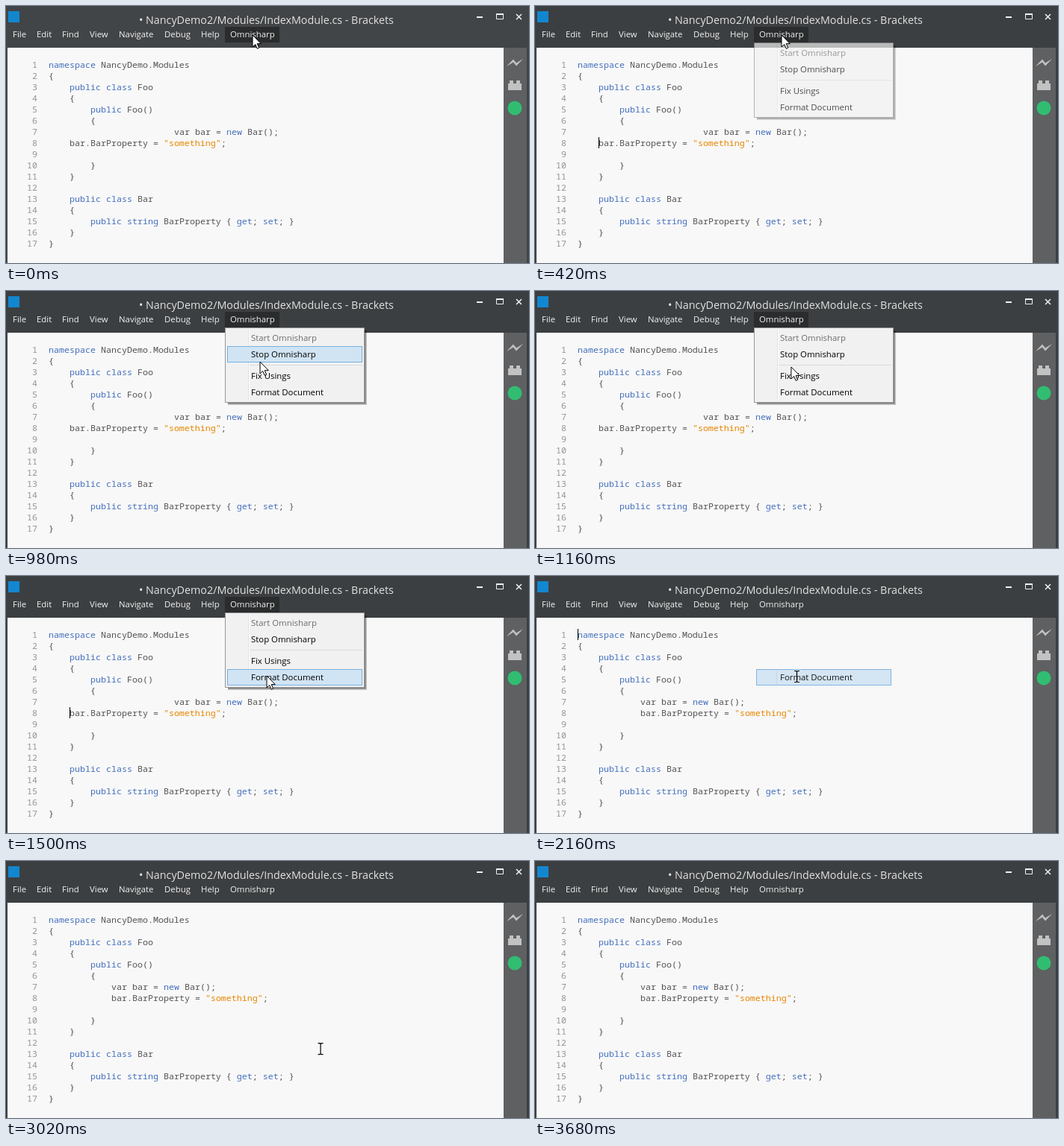
An HTML page for the animation above (3900 ms loop, 700x345 px).

```html
<!DOCTYPE html>
<html lang="en">
<head>
<meta charset="utf-8">
<title>Format document</title>
<style>
  html, body { margin: 0; width: 100%; height: 100%; overflow: hidden; background: #3c3f41; }
  svg { display: block; width: 700px; height: 345px; }
  text { white-space: pre; }
  .ui { font: 11.4px "Open Sans", "Noto Sans", sans-serif; }
  .title { font: 14.3px "Open Sans", "Noto Sans", sans-serif; }
  .code { font: 11.667px "Noto Sans Mono", "DejaVu Sans Mono", monospace; fill: #535353; }
  .number { fill: #949494; text-anchor: end; }
  .keyword { fill: #446fbd; }
  .string { fill: #e88501; }
</style>
</head>
<body>
<svg id="stage" viewBox="0 0 700 345"></svg>
<script>
const LOOP = 3900;
const stage = document.getElementById("stage");

function add(parent, tag, attrs = {}, text) {
  const node = document.createElementNS("http://www.w3.org/2000/svg", tag);
  for (const key in attrs) node.setAttribute(key, attrs[key]);
  if (text !== undefined) node.textContent = text;
  parent.append(node);
  return node;
}
const rect = (parent, x, y, width, height, fill, more) =>
  add(parent, "rect", { x, y, width, height, fill, ...more });
const label = (parent, x, y, text, fill, cls = "ui") =>
  add(parent, "text", { x, y, fill, class: cls }, text);
const show = (node, opacity) => node.setAttribute("opacity", opacity);
const move = (node, [x, y]) => node.setAttribute("transform", `translate(${x} ${y})`);

// Window frame
const frame = rect(stage, 0, 0, 700, 345, "#3c3f41");
const menuTab = rect(stage, 293, 28, 73, 21, "#2a2c2d");
rect(stage, 2, 56, 664, 289, "#f8f8f8");
rect(stage, 666, 56, 31, 289, "#5e6062");
rect(stage, 3, 7, 15, 15, "#1287d0");
label(stage, 178, 24, "• NancyDemo2/Modules/IndexModule.cs - Brackets", "#e2e2e2", "title");
const menus = { File: 9, Edit: 41, Find: 75, View: 112, Navigate: 151, Debug: 212, Help: 261, Omnisharp: 300 };
for (const name in menus) label(stage, menus[name], 42, name, "#f2f2f2");
rect(stage, 630, 14, 8, 2, "#f0f0f0");
add(stage, "path", { d: "M656.5 11V17.5H665.5V11Z", fill: "none", stroke: "#f0f0f0" });
rect(stage, 656, 10, 10, 2, "#f0f0f0");
add(stage, "path", { d: "M683 11L690 18M690 11L683 18", stroke: "#f0f0f0", "stroke-width": 1.5 });

// Side bar
add(stage, "path", { d: "M670 81L679 71.5L683 76.5L692 71L683 80.5L679 75.5Z", fill: "#c2c2c2" });
add(stage, "path", { d: "M672 113V104H674V100H679V104H683V100H688V104H690V113Z", fill: "#c2c2c2" });
add(stage, "circle", { cx: 681, cy: 137, r: 9.5, fill: "#31bd71" });

// Code
const lines = [
  "namespace NancyDemo.Modules", "{", "    public class Foo", "    {",
  "        public Foo()", "        {", "            var bar = new Bar();",
  "            bar.BarProperty = \"something\";", "", "        }", "    }", "",
  "    public class Bar", "    {", "        public string BarProperty { get; set; }",
  "    }", "}"
];
const tokens = /("[^"]*"|\b(?:namespace|public|class|new|string|get|set)\b)/;

const rows = lines.map((line, i) => {
  const y = 83 + 15 * i;
  label(stage, 42, y, i + 1, "#949494", "code number");
  const row = add(stage, "text", { x: 57 + 7 * line.search(/\S|$/), y, class: "code" });
  // Splitting on a captured group leaves the tokens at odd places
  line.trim().split(tokens).forEach((part, n) => {
    const token = part[0] === '"' ? "string" : "keyword";
    add(row, "tspan", { class: n % 2 ? token : "" }, part);
  });
  return row;
});
const caret = rect(stage, 0, 0, 1, 15, "#000");

// Drop-down menu
const ITEM_HEIGHT = 22;
const items = [
  { name: "Start Omnisharp", top: 52, color: "#6d6d6d" },
  { name: "Stop Omnisharp", top: 74, color: "#000" },
  { name: "Fix Usings", top: 103, color: "#000" },
  { name: "Format Document", top: 125, color: "#000" }
];
const dropdown = add(stage, "g");
for (let i = 3; i > 0; i--)
  rect(dropdown, 297, 53, 183 + i, 97 + i, "#000", { opacity: 0.2 });
rect(dropdown, 293.5, 49.5, 186, 100, "#f1f1f1", { stroke: "#979797" });

function highlight(parent, top) {
  const group = add(parent, "g");
  rect(group, 296.5, top + 0.5, 180, ITEM_HEIGHT - 1, "#d1e4f4", { stroke: "#78b0e0" });
  return group;
}
const drawItem = (parent, { name, top, color }) => label(parent, 328, top + 15, name, color);

rect(dropdown, 324, 52, 1, 95, "#e0e0e0");
rect(dropdown, 325, 52, 1, 95, "#fff");
rect(dropdown, 326, 99, 151, 1, "#dadada");
items.forEach((item, i) => {
  if (i) item.glow = highlight(dropdown, item.top);
  drawItem(dropdown, item);
});

// Chosen item, which lingers after the menu closes
const chosen = highlight(stage, 125);
rect(chosen, 323, 127, 1, 18, "#c3d6e6");
drawItem(chosen, items[3]);

// Pointers
const arrow = add(stage, "path", {
  d: "M0 0V16L3.7 12.5L6.3 18.3L8.7 17.2L6.2 11.6H11.3Z",
  fill: "#fff", stroke: "#000", "stroke-linejoin": "round"
});
const beam = add(stage, "path", {
  d: "M-3.5 -7.5H-1L0 -6.5L1 -7.5H3.5M0 -7V7M-3.5 7.5H-1L0 6.5L1 7.5H3.5",
  fill: "none", stroke: "#000", "stroke-width": 1.2
});

const clamp = v => Math.min(1, Math.max(0, v));
const mix = (a, b, p) => a + (b - a) * p;

// Keys are [time, x, y], in order
function along(keys, t) {
  let i = 0;
  while (i < keys.length - 2 && t >= keys[i + 1][0]) i++;
  const [a, b] = [keys[i], keys[i + 1]];
  const p = clamp((t - a[0]) / (b[0] - a[0]));
  return [mix(a[1], b[1], p), mix(a[2], b[2], p)];
}
const arrowKeys = [[740, 330, 39], [980, 340, 95], [1290, 345, 107], [1490, 349, 134]];

function draw(t) {
  const formatted = t >= 2160;
  frame.setAttribute("fill", t < 330 ? "#424547" : "#3c3f41");
  show(menuTab, formatted ? 0 : 1);
  rows[6].setAttribute("x", formatted ? 141 : 225);
  rows[7].setAttribute("x", formatted ? 141 : 85);

  const caretOn = [[330, 830], [1320, 1830], [2160, 2650], [3150, 3680]]
    .some(([from, to]) => t >= from && t < to);
  move(caret, formatted ? [57, 71] : [85, 176]);
  show(caret, caretOn ? 1 : 0);

  const tip = along(arrowKeys, t);
  show(dropdown, t < 330 || formatted ? 0 : clamp((t - 290) / 190));
  for (const { glow, top } of items)
    if (glow) show(glow, tip[1] >= top && tip[1] < top + ITEM_HEIGHT ? 1 : 0);
  show(chosen, formatted ? 0.92 * clamp((2420 - t) / 260) : 0);

  move(arrow, tip);
  show(arrow, formatted ? 0 : 1);
  const leave = clamp((t - 2750) / 370) ** 1.5;
  move(beam, [mix(350.5, 463, leave), mix(135, 322, leave)]);
  show(beam, formatted && t < 3150 ? 1 : 0);
}

const start = performance.now();
function tick() {
  draw((performance.now() - start) % LOOP);
  requestAnimationFrame(tick);
}
tick();
</script>
</body>
</html>
```
